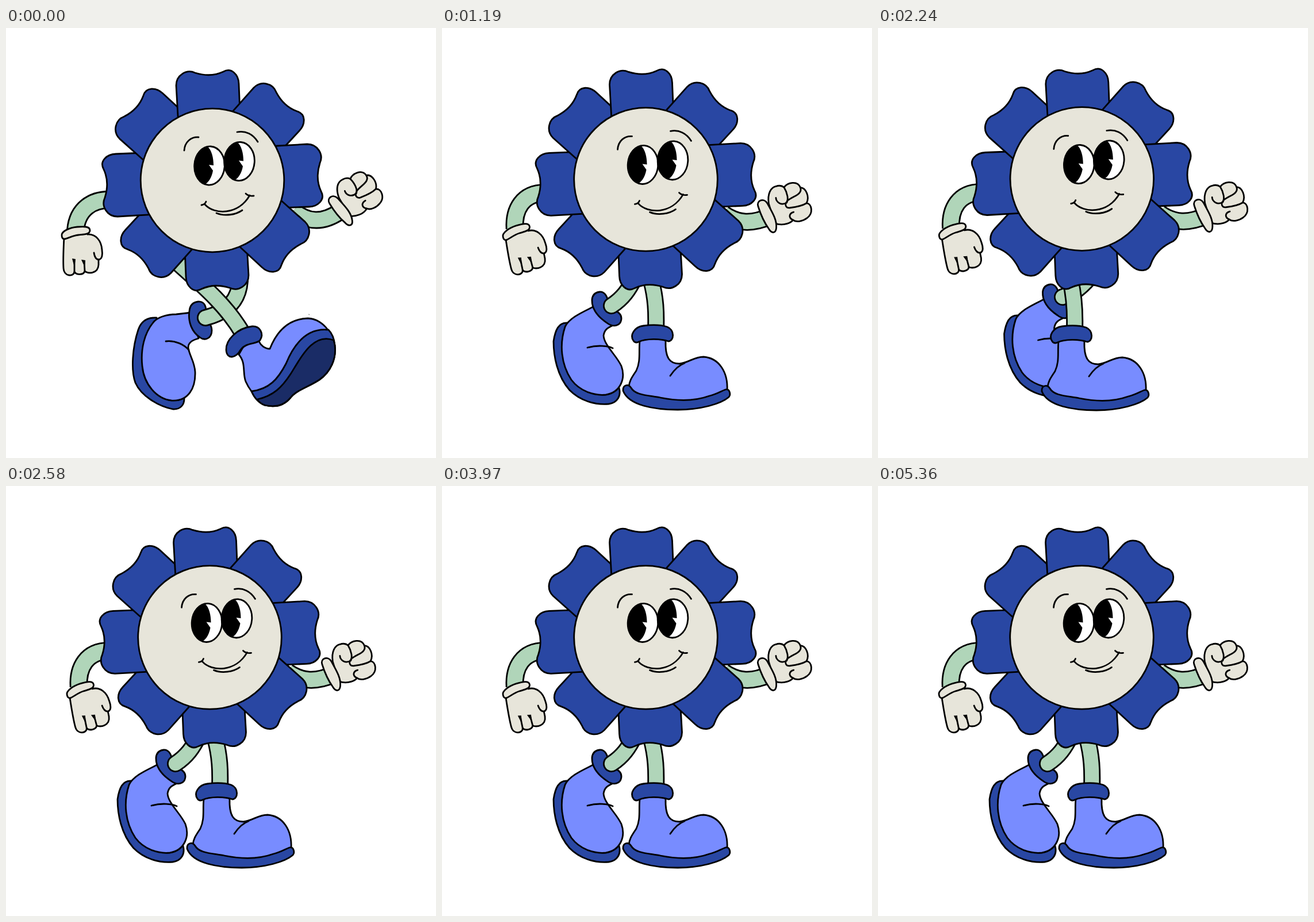
Recreate the animation shown at these times as an HTML page. Size 748 by 748 pixels, loop 5.56 s.

```html
<!DOCTYPE html>
<html lang="en">
<head>
<meta charset="utf-8">
<title>Walking flower</title>
<style>
  html, body { margin: 0; width: 100%; height: 100%; overflow: hidden; background: #fff; }
  svg { display: block; width: 100%; height: 100%; }
  .pose { visibility: hidden; }
  .pose.on { visibility: visible; }
  path, ellipse, circle { stroke: #000; stroke-width: 2.8; stroke-linejoin: round; stroke-linecap: round; fill: none; }
  .blue { fill: #2947a3; }
  .sky { fill: #788cff; }
  .navy { fill: #1a2c66; }
  .cream { fill: #e7e5da; }
  .white { fill: #fff; }
  .black { fill: #000; stroke: none; }
</style>
</head>
<body>
<svg id="stage" viewBox="0 0 748 748" xmlns="http://www.w3.org/2000/svg"></svg>
<script>
const path = (d, cls = "") => `<path class="${cls}" d="${d}"/>`;
const group = (transform, body) => `<g transform="${transform}">${body}</g>`;
const shift = ([x, y], body) => group(`translate(${x} ${y})`, body);

// A limb is a black stroke with a thinner green one on top.
const tube = (d, width = 30, cap = "butt") =>
  [["#000", width], ["#b0d5b9", width - 5.6]].map(([color, w]) =>
    `<path d="${d}" style="stroke:${color};stroke-width:${w};stroke-linecap:${cap}"/>`).join("");

const PETAL = "M-59 -95L-63 -165C-63 -183 -45 -194 -30 -187C-14 -182 4 -182 19 -189C33 -197 45.5 -184 46 -168L48.5 -105Z";

function flower() {
  let petals = "";
  for (let i = 0; i < 8; i++) {
    petals += group(`translate(359 265) rotate(${180 + i * 45})`, path(PETAL, "blue"));
  }
  const pupil = path("M350 206C358 212 361 226 361 239L353 238L360 248C358 260 352 269 346 272C333 268 327 254 327 238C328 220 338 208 350 206Z", "black");
  const eye = `<ellipse class="white" cx="354" cy="239.5" rx="26.3" ry="33.6" transform="rotate(4 354 239.5)"/>` + pupil;
  return petals +
    `<circle class="cream" cx="359" cy="265" r="124.8"/>` +
    path("M310 213C311 198 322 189 335 190M402 181C417 178 430 185 438 198") +
    eye + shift([52, -7.5], eye) +
    path("M346 307C362 325 404 326 424 291M340 308Q346 307 348 302M417 288Q422 293 431 292M366 322C380 328 400 325 411 317");
}

const openHand =
  path("M101 363C100 385 99 402 100 418C101 433 118 433 119 424C122 430 135 430 137 423C142 428 160 428 161 412L161 403C168 402 168 393 167 386C166 370 156 358 142 359L140 352L104 356Z", "cream") +
  path("M153 391C154 398 157 403 162 403M119 405L119 424M136 406L137 423") +
  path("M115 401L121 402L119 416ZM131 403L138 404L137 416Z", "black") +
  path("M97 361C96 353 112 347 124 346C136 345 146 345 146 352C146 359 136 359 126 360C116 361 108 366 102 367C98 367 97 364 97 361Z", "cream");

const fist =
  path("M560 348C563 330 572 322 582 323C588 323 592 326 594 329C602 323 620 324 621 338C630 341 632 358 623 367C632 371 629 388 616 392C608 395 596 394 592 388C582 394 568 390 560 384Z", "cream") +
  path("M594 329C597 341 595 352 590 356C580 358 573 350 575 342M592 353C602 349 612 350 617 346C620 344 621 341 621 338M592 354C585 357 586 365 593 366C604 368 615 369 623 367M592 388C585 382 588 375 597 375") +
  path("M541 347C541 336 555 335 558 347C560 360 566 378 560 392C556 402 549 399 547 390C543 378 541 362 541 347Z", "cream");

const turn = (piece, [px, py], [x, y], angle) =>
  group(`translate(${x} ${y}) rotate(${angle}) translate(${-px} ${-py})`, piece);

const arms = (left, right, leftWrist, leftTurn, rightWrist, rightTurn) =>
  tube(left, 32) + tube(right, 31) +
  turn(openHand, [121.5, 356], leftWrist, leftTurn) +
  turn(fist, [552, 368], rightWrist, rightTurn);

const armsHigh = arms("M185 299C150 297 124 315 121 352", "M500 318C525 338 550 340 580 320",
  [121.5, 356], 0, [583, 317.5], -31);
const armsMid = arms("M180 286C140 286 125 315 127 348", "M490 322C515 340 540 340 570 327",
  [129.5, 353], -11.5, [567, 326], -17.5);
const armsLow = arms("M180 297C150 297 133 328 137 362", "M490 360C510 369 530 371 550 369",
  [142, 365.5], -21, [552, 368], 0);

const heelUp =
  path("M262 504C245 503 235 510 230 525C220 555 217 595 225 617C235 640 265 658 290 663C303 664 311 656 310 642L262 560Z", "blue") +
  path("M322 495L296 498C278 498 264 504 258 510C240 530 234 560 237 588C240 620 262 645 288 648C318 650 330 625 329 598C328 580 319 570 317 556C317 547 324 543 335 540Z", "sky") +
  path("M278 545C295 543 310 551 318 560") +
  path("M334 476C345 475 350 485 347 498C346 508 358 512 358 526C358 540 346 545 337 538C324 529 316 512 319 492C320 482 326 477 334 476Z", "blue");

const footLift =
  path("M218 513C203 512 197 525 194 545C194 570 200 605 222 630C240 648 265 656 290 654C305 652 312 640 308 626L240 560Z", "blue") +
  path("M263 485C245 494 220 505 214 520C204 550 207 585 225 612C240 632 265 640 285 638C310 634 320 610 312 588C304 570 282 552 281 535C283 522 292 520 300 516Z", "sky") +
  path("M253 556C270 551 290 553 297 557") +
  path("M274 459C284 458 288 468 290 480C294 492 313 492 312 506C311 519 297 521 287 513C272 503 260 490 261 472C262 464 266 460 274 459Z", "blue");

// The underside runs from the toe back to the heel.
const UNDERSIDE = "C575 575 565 598 545 612C525 625 505 630 495 643C485 655 470 661 450 656";
const HEEL = "C440 652 432 644 427 632";
const toeUp =
  path(`M405 568C418 583 411 600 417 615C420 622 424 628 427 632L450 656L572 552C568 530 550 506 525 505C490 506 470 530 459 558C450 558 443 552 440 545L425 533Z`, "sky") +
  path(`M427 632C458 628 473 611 487 584C500 552 522 521 561 525C568 532 571 541 572 552${UNDERSIDE}${HEEL}Z`, "blue") +
  path(`M437 646C465 640 480 625 495 602C515 570 535 530 570 543L572 552${UNDERSIDE}C444 654 440 651 437 646Z`, "navy") +
  path("M383 560C382 543 402 522 428 519C442 518 449 532 442 543C435 551 418 546 408 560C401 574 384 578 383 560Z", "blue");

const flatFoot =
  path("M314 545C312 565 316 580 308 597C301 608 296 614 295 625L310 652L440 655L466 632C468 600 452 575 425 573C408 573 400 583 383 585C366 585 358 575 359 545L337 530Z", "sky") +
  path("M367 606C373 597 381 588 392 584") +
  path("M285 632C284 622 294 619 299 627C306 640 330 640 350 644C380 650 410 650 435 641C448 638 455 633 463 630C470 628 473 638 469 643C455 655 420 665 380 665C340 665 295 658 285 632Z", "blue") +
  path("M303 545C296 535 305 521 320 519C335 517 350 517 362 521C375 527 374 545 364 546C350 541 325 541 312 547C308 549 305 548 303 545Z", "blue");

const legs = (backFoot, backLeg, frontLeg, frontFoot) =>
  backFoot + tube(backLeg, 30, "round") + tube(frontLeg) + frontFoot;

const head = flower();
const poses = [
  armsHigh +
    legs(heelUp, "M407 440C405 470 390 493 347 504", "M300 410C345 450 385 485 411 530", toeUp) +
    path("M526.5 497.5Q528.5 498 527 499.5", "black") + head,
  armsMid +
    legs(shift([25.5, -13], footLift), "M375 425C355 452 335 464 321 468", "M335 440C342 470 343 495 342 525", flatFoot) +
    shift([-4.2, -2.5], head),
  armsLow +
    legs(shift([-62, -1.5], heelUp), "M344 446C337 480 320 495 286 503", "M367 446C396 467 412 495 429 526", shift([20, -5.5], toeUp)) +
    shift([-5.8, 1.5], head),
  shift([-0.3, 1], armsMid) +
    legs(footLift, "M335 435C325 455 315 470 295 483", "M364 440C372 470 373 495 372 525", shift([30, -1], flatFoot)) +
    shift([-4.5, -1.6], head)
];

const stage = document.getElementById("stage");
stage.innerHTML = poses.map(body => `<g class="pose">${body}</g>`).join("");
const layers = [...stage.children];

// Eight beats per round; the last one is held a little longer.
const BEAT = 170, ROUND = 1390;
const start = performance.now();

function draw() {
  const t = (performance.now() - start) % ROUND;
  const pose = Math.min(7, Math.floor(t / BEAT)) % 4;
  layers.forEach((layer, i) => layer.classList.toggle("on", i === pose));
  requestAnimationFrame(draw);
}
draw();
</script>
</body>
</html>
```
